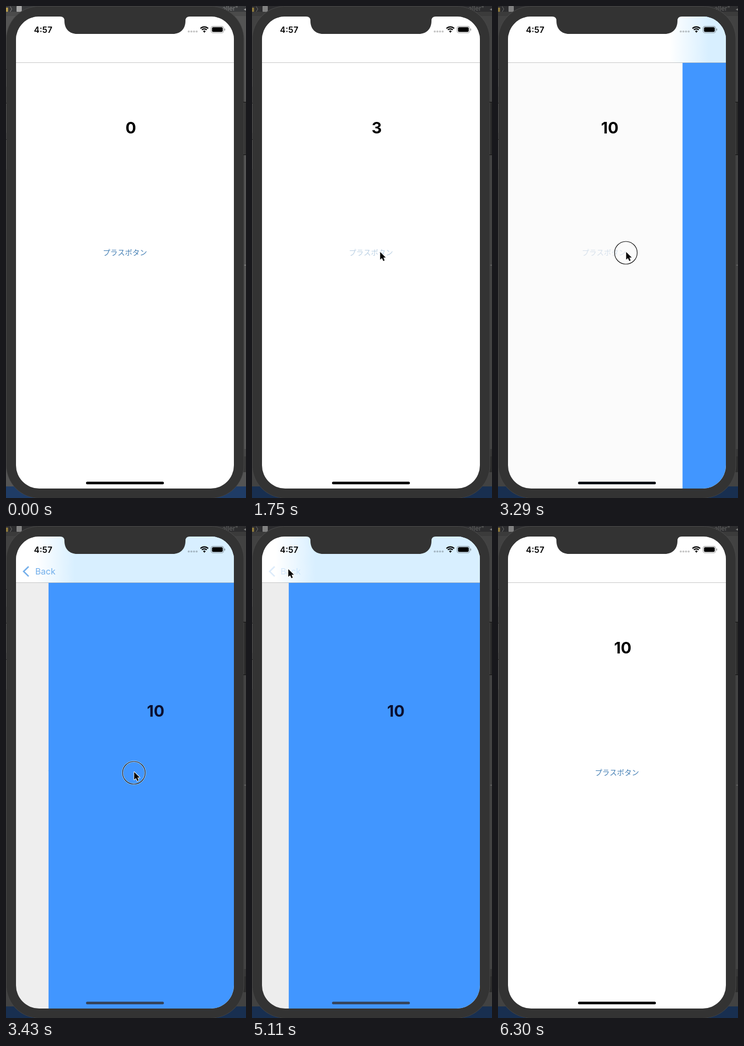
Write an HTML page with a canvas that moves like this. It is 456 px wide and 934 px high and loops after 6580 ms.

```html
<!DOCTYPE html>
<html lang="ja">
<head>
<meta charset="utf-8">
<style>
html, body { margin: 0; width: 100%; height: 100%; overflow: hidden; background: #333; }
canvas { display: block; }
</style>
</head>
<body>
<canvas id="stage" width="456" height="934"></canvas>
<script>
const ctx = document.getElementById('stage').getContext('2d');
const LOOP = 6580, STEP = 70;
const LEFT = 19, TOP = 20, WIDTH = 414, BOTTOM = 916, BAR = 108;
const PUSH = 3245, POP = 5077, ACTIVATE = 840;
const LATIN = 'Inter, sans-serif';
const KANA = '"Noto Sans CJK JP", "Noto Sans CJK", sans-serif';

// [touch down, touch up] on the plus button
const taps = [[1050, 1190], [1330, 1470], [1610, 1680], [1890, 1960], [2100, 2170],
  [2310, 2380], [2450, 2590], [2660, 2800], [2870, 3010], [3080, 3150], [3290, 3500]];
const backTap = [4970, 5075];
// [time, x, y] of the pointer tip
const route = [[70, 442, 911], [700, 243.5, 467], [3570, 243.5, 467], [3990, 227, 649],
  [4200, 224, 652], [4830, 69, 82], [5180, 69, 82], [5740, 243, 851], [6300, 248, 935]];

const clamp = v => Math.max(0, Math.min(1, v));
const within = (t, [a, b]) => t >= a && t < b;

function rect(x, y, w, h, color, r = 0) {
  ctx.beginPath();
  ctx.roundRect(x, y, w, h, r);
  ctx.fillStyle = color;
  ctx.fill();
}

function text(str, x, y, font, color, align = 'center') {
  ctx.font = font;
  ctx.textAlign = align;
  ctx.fillStyle = color;
  ctx.fillText(str, x, y);
}

function stroke(path, color, width) {
  ctx.strokeStyle = color;
  ctx.lineWidth = width;
  ctx.stroke(path);
}

// Critically damped spring, 0 to 1
function spring(ms) {
  if (ms <= 0) return 0;
  if (ms >= 560) return 1;
  const w = 0.01826 * ms;
  return 1 - (1 + w) * Math.exp(-w);
}

function pointerAt(t) {
  const i = route.findIndex(p => p[0] > t);
  if (i < 1) return null;
  const [t0, x0, y0] = route[i - 1], [t1, x1, y1] = route[i];
  const u = (t - t0) / (t1 - t0), e = u * u * (3 - 2 * u);
  return [x0 + (x1 - x0) * e, y0 + (y1 - y0) * e];
}

function drawDesktop(active) {
  rect(0, 0, 456, 934, '#545454');
  rect(0, 0, 456, 11, '#393a3c');
  rect(0, 11, 456, 8, '#4b4b4b');
  rect(0, 3, 4, 8, '#b39a4c', 1);
  text('〉', 7, 10, '11px ' + KANA, '#999', 'left');
  rect(20, 0, 10, 11, '#a5a5a5', 1);
  text('aller"', 441, 9, '12px ' + LATIN, '#808080', 'right');
  text('◂', 456, 9, '9px "DejaVu Sans", sans-serif', '#999', 'right');
  rect(450, 182, 6, 101, '#353535');
  rect(450, 491, 6, 2, '#777');
  rect(450, 841, 6, 14, '#444');
  rect(450, 855, 6, 30, '#383838');
  rect(0, 912, 456, 22, '#1f3c66');
  if (active) rect(0, 0, 456, 934, 'rgba(0,0,0,.22)');
}

const notch = new Path2D('M103 19V20Q111 20 111 28C111 44 121 53 135 53H317C331 53 341 44 341 28Q341 20 349 20V19Z');

function drawBody() {
  rect(0, 0, 452.5, 934.5, '#484848', 63);
  rect(1, 1, 450.5, 933, '#333', 62);
  for (const [y, h] of [[120, 33], [184, 57], [253, 57]]) {
    rect(0, y, 1, h, '#555');
    rect(0, y, 1, 1, '#111');
  }
  rect(451, 182, 5, 1, '#111');
  rect(451, 282, 5, 1, '#111');
}

function drawCounter(n, alpha, shift, dim) {
  rect(LEFT, TOP, WIDTH, BOTTOM - TOP, '#fff');
  text(n, 237 - shift, 242, '700 30px ' + LATIN, '#000');
  ctx.globalAlpha = alpha;
  text('プラスボタン', 226 - shift, 473, '350 14px ' + KANA, '#447fb4');
  ctx.globalAlpha = 1;
  if (dim) rect(LEFT, TOP, WIDTH, BOTTOM - TOP, `rgba(0,0,0,${dim})`);
}

function drawNavBar(p, edge, backAlpha) {
  rect(LEFT, TOP, WIDTH, BAR - TOP, '#fff');
  if (p > 0) {
    const soft = Math.min(1, (edge - LEFT) / 50);
    const tint = ctx.createLinearGradient(edge - 25 * soft, 0, edge + 50 * soft + 0.1, 0);
    tint.addColorStop(0, '#d8efff00');
    tint.addColorStop(1, '#d8efff');
    rect(LEFT, TOP, WIDTH, BAR - TOP, tint);
    ctx.globalAlpha = backAlpha;
    stroke(new Path2D('M43 77L33.5 86.3L43 95.6'), '#3b8ee2', 2.7);
    text('Back', 48 + (1 - p) * 50, 92, '16.5px ' + LATIN, '#3b8ee2', 'left');
    ctx.globalAlpha = 1;
  }
  rect(LEFT, BAR - 1, WIDTH, 1, 'rgba(0,0,0,.22)');
}

function drawStatus() {
  text('4:57', 70.5, 50.5, '600 16px ' + LATIN, '#000');
  for (let i = 0; i < 4; i++) rect(345.3 + i * 5, 46.5, 3.8, 3.8, 'rgba(0,0,0,.23)', 2);
  for (const r of [3, 6.6, 10.4]) {
    ctx.beginPath();
    ctx.arc(376.8, 50, r, -Math.PI * 0.75, -Math.PI * 0.25);
    if (r === 3) {
      ctx.lineTo(376.8, 50.5);
      ctx.fillStyle = '#000';
      ctx.fill();
    }
    ctx.strokeStyle = '#000';
    ctx.lineWidth = r === 3 ? 1 : 2.2;
    ctx.stroke();
  }
  const shell = new Path2D();
  shell.roundRect(389.6, 38.6, 24, 12.4, 3.8);
  stroke(shell, 'rgba(0,0,0,.38)', 1.1);
  rect(391.4, 40.3, 20.4, 9, '#000', 2.2);
  rect(414.8, 42.8, 1.5, 4, 'rgba(0,0,0,.42)', 1);
}

const arrow = new Path2D('M0 0V14.5L3.4 11.4L5.9 17L8.5 15.9L6.1 10.4H10.6Z');

function drawPointer([x, y], pressed) {
  if (pressed) {
    const ring = new Path2D();
    ring.arc(x - 0.5, y + 1.5, 21.5, 0, Math.PI * 2);
    stroke(ring, 'rgba(255,255,255,.6)', 3);
    stroke(ring, '#111', 1.2);
  }
  ctx.save();
  ctx.translate(x, y);
  ctx.lineJoin = 'round';
  stroke(arrow, '#fff', 2);
  ctx.fillStyle = '#000';
  ctx.fill(arrow);
  ctx.restore();
}

function draw(t) {
  const p = t < POP ? spring(t - PUSH) : 1 - spring(t - POP);
  const edge = LEFT + WIDTH * (1 - p);
  const released = taps.filter(tap => t >= tap[1]);
  const tapping = taps.some(tap => within(t, tap));
  const count = Math.min(10, released.length);
  const sinceUp = released.length ? t - released[released.length - 1][1] : LOOP;
  const buttonAlpha = tapping ? 0.2 : 0.2 + 0.8 * clamp(sinceUp / 350);
  const backPressed = within(t, backTap);
  const backAlpha = t >= POP ? 0.2 * p : backPressed ? 0.2 : clamp(1 - 2 * (1 - p));

  drawDesktop(t >= ACTIVATE);
  drawBody();
  ctx.save();
  ctx.beginPath();
  ctx.roundRect(LEFT, TOP, WIDTH, BOTTOM - TOP, 44);
  ctx.clip();
  drawCounter(count, buttonAlpha, p * WIDTH * 0.3, p * 0.08);
  if (p > 0) {
    rect(edge, TOP, WIDTH, BOTTOM - TOP, '#4196ff');
    text('10', edge + 203.5, 362, '700 30px ' + LATIN, '#0b1030');
  }
  drawNavBar(p, edge, backAlpha);
  drawStatus();
  rect(152, 903, 148, 5, `rgb(${62 * p},${80 * p},${106 * p})`, 2.5);
  ctx.fillStyle = '#333';
  ctx.fill(notch);
  ctx.restore();

  const pointer = pointerAt(t);
  if (pointer) drawPointer(pointer, tapping || backPressed);
}

const start = performance.now();
function tick() {
  const t = (performance.now() - start) % LOOP;
  draw(Math.floor(t / STEP) * STEP);
  requestAnimationFrame(tick);
}
tick();
</script>
</body>
</html>
```
